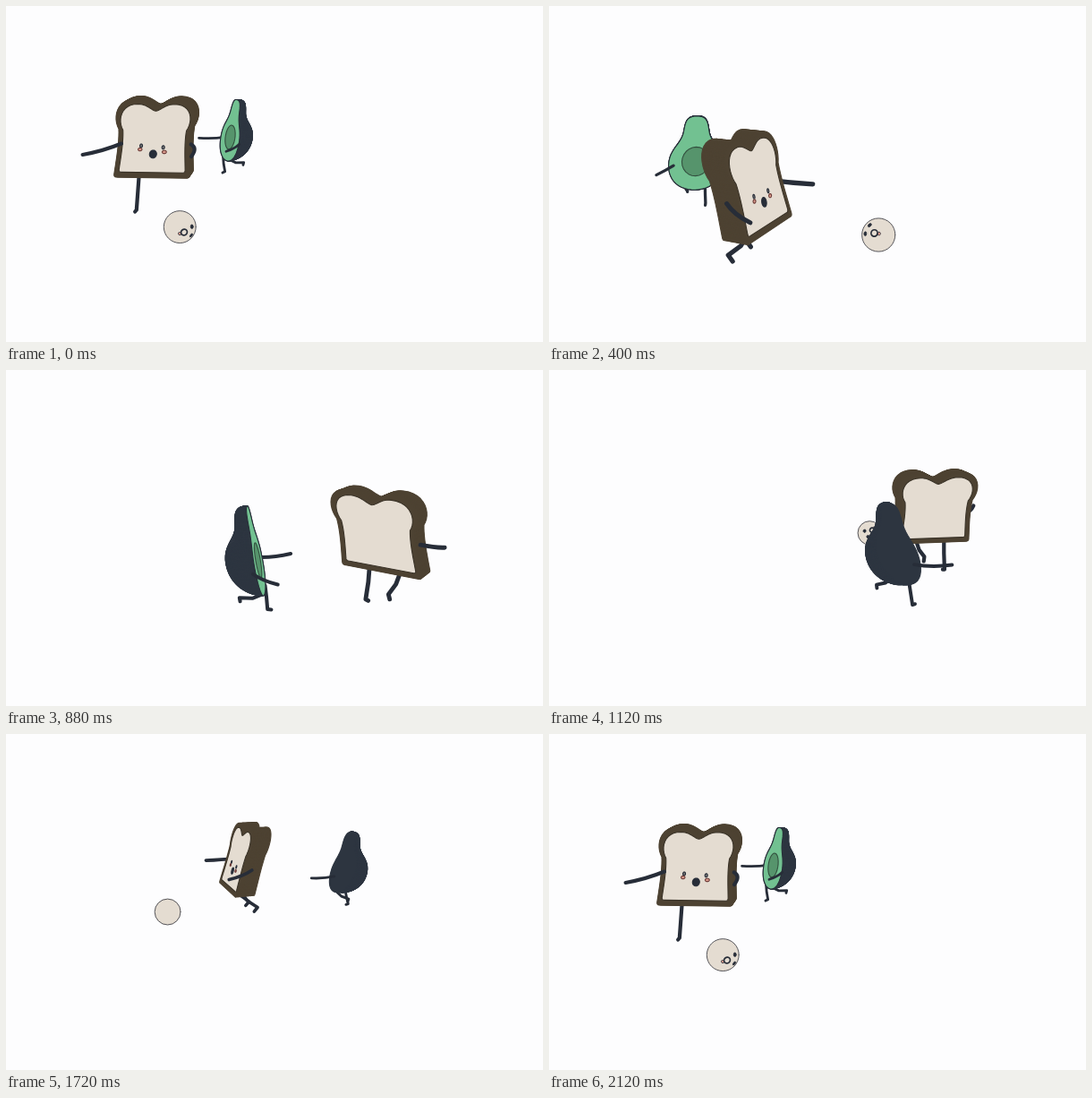
Write an HTML page with a canvas that moves like this. It is 600 px wide and 375 px high and loops after 2160 ms.

```html
<!DOCTYPE html>
<html lang="en">
<head>
<meta charset="utf-8">
<title>Toast chase</title>
<style>
html, body { margin: 0; width: 100%; height: 100%; overflow: hidden; background: #fdfdfe; }
canvas { display: block; }
</style>
</head>
<body>
<canvas id="stage" width="600" height="375"></canvas>
<script>
const ctx = document.getElementById('stage').getContext('2d');
const { sin, cos, sqrt, abs, max, hypot, atan2, PI } = Math;
const LOOP = 2160, STEP = 40, LAP = 2120, STRIDES = 4, ROLLS = 3, RING = 133, RAD = PI / 180;
const INK = '#272d38', CREAM = '#e4dcd1', CRUST = '#4d4232', GREEN = '#72c191',
      PIT = '#56946c', SKIN = '#2d3540', BLUSH = '#d99a8c';

// World: x right, y down, z towards the viewer; the camera looks down a little.
const SLOPE = 0.27;
const zoom = z => 1 / (1 - z / 695);
const project = (x, y, z) => [298 + x * zoom(z), 187.5 + (y + SLOPE * z) * zoom(z), z];
const ringPoint = angle => [-RING * cos(angle), RING * sin(angle)];

// Left half of an outline, given as cubic curves, mirrored to a closed polygon.
function outline(x, y, curves) {
  const left = [[x, y]];
  for (const [a, b, c, d, e, f] of curves) {
    for (let i = 1; i <= 12; i++) {
      const u = i / 12, v = 1 - u;
      const mix = (p, q, r, s) => v * v * v * p + 3 * v * v * u * q + 3 * v * u * u * r + u * u * u * s;
      left.push([mix(x, a, c, e), mix(y, b, d, f)]);
    }
    [x, y] = [e, f];
  }
  return left.concat(left.map(([p, q]) => [-p, q]).reverse());
}
const slice = outline(0, -35, [
  [-6, -36, -12, -44, -24, -44], [-47, -44, -49, -22, -41, -10],
  [-39, 5, -41, 25, -42, 40], [-42, 43, -40, 43, -38, 43]
]);
const pear = outline(0, -50, [
  [-14, -50, -15, -42, -17, -30], [-19, -12, -36, -6, -36, 16], [-36, 38, -20, 50, 0, 50]
]);
const disc = Array.from({ length: 24 }, (_, i) => [cos(i * PI / 12), sin(i * PI / 12)]);

// A body stands on the ring, faces along it and leans back.
function makeBody(angle, { size, height, tilt }, bob) {
  const [cx, cz] = ringPoint(angle), yaw = angle + 3 * RAD, c = cos(yaw), n = sin(yaw);
  const at = (X, Y, Z) => {
    const f = Z + tilt * Y;
    return project(cx + size * (X * c + f * n), height + bob + size * Y * 0.95, cz + size * (f * c - X * n));
  };
  const [o, a, b] = [at(0, 0, 0), at(1, 0, 0), at(0, 1, 0)];
  const front = (a[0] - o[0]) * (b[1] - o[1]) > (a[1] - o[1]) * (b[0] - o[0]);
  return { at, front, depth: cz, scale: size * zoom(cz) };
}

function patch(body, points, fill, stroke) {
  ctx.beginPath();
  for (const p of points) ctx.lineTo(...body.at(...p).slice(0, 2));
  ctx.closePath();
  ctx.fillStyle = fill;
  ctx.fill();
  ctx.strokeStyle = stroke;
  ctx.lineWidth = 1.1;
  ctx.stroke();
}
const flat = (shape, z, sx = 1, sy = sx, x = 0, y = 0) => shape.map(([X, Y]) => [X * sx + x, Y * sy + y, z]);

function limb(body, points, width, curved) {
  const p = points.map(q => body.at(...q).slice(0, 2));
  ctx.beginPath();
  if (curved) {
    ctx.moveTo(...p[0]);
    ctx.quadraticCurveTo(...p[1], ...p[2]);
  } else p.forEach(q => ctx.lineTo(...q));
  ctx.strokeStyle = INK;
  ctx.lineWidth = width * body.scale;
  ctx.stroke();
}

function leg(body, side, phase, { hip, shin, width }) {
  const back = (1 - cos(phase)) / 2, a = 1.2 * back ** 0.7, b = 1.35 * a;
  const X = side * hip[0];
  const knee = [X, hip[1] + shin * cos(a), -shin * sin(a)];
  const heel = [X, knee[1] + shin * cos(b), knee[2] - shin * sin(b)];
  const toe = [X, heel[1] + shin * 0.3 * sin(b), heel[2] + shin * 0.3 * cos(b)];
  limb(body, [[X, hip[1], 0], knee, heel, toe], width);
}

function arm(body, side, phase, { shoulder, reach, length, width }) {
  const e = reach + (1 - reach) * abs(cos(phase / 2));
  const [X, Y, Z] = [side * shoulder[0], shoulder[1], shoulder[2]];
  const elbow = [X + side * length * (8 + 6 * e), Y + 4, Z + length * 20 * e];
  const hand = [X + side * length * (2 + 26 * e), Y + 12 - 10 * e, Z + length * (6 + 40 * e)];
  const points = [[X, Y, Z], elbow, hand];
  const ahead = body.at(...points[0])[2] + body.at(...hand)[2] > 2 * body.depth;
  return { ahead, draw: () => limb(body, points, width, true) };
}

function runner(angle, phase, build) {
  const body = makeBody(angle, build, -build.bounce * cos(2 * phase));
  const stride = side => phase + (side > 0 ? PI : 0);
  const paint = () => {
    const arms = [-1, 1].map(side => arm(body, side, stride(side), build));
    for (const side of [-1, 1]) leg(body, side, stride(side), build);
    arms.filter(a => !a.ahead).forEach(a => a.draw());
    build.torso(body);
    arms.filter(a => a.ahead).forEach(a => a.draw());
  };
  return { depth: body.depth, paint };
}

function breadTorso(body) {
  const near = body.front ? 12 : -12;
  for (let i = -8; i <= 8; i++) patch(body, flat(slice, near * i / 8), CRUST, CRUST);
  patch(body, flat(slice, near, 0.88, 0.87), CREAM, '#3a3328');
  if (!body.front) return;
  const dot = (x, y, rx, ry, fill, stroke) => patch(body, flat(disc, near, rx, ry, x, y), fill, stroke);
  dot(-14, 8.5, 1.5, 2, '#777', INK);
  dot(11, 10, 1.5, 2, '#777', INK);
  dot(-15, 12.5, 2.2, 1.6, BLUSH, '#6b3a36');
  dot(12.5, 15, 2.4, 1.7, BLUSH, '#6b3a36');
  dot(0, 17.5, 4, 4.3, INK, INK);
}

// The skin is half a solid of revolution behind the flat cut.
function pearTorso(body) {
  for (let i = 24; i >= 0; i--) {
    const a = i / 24 * PI / 2;
    patch(body, pear.map(([X, Y]) => [X * cos(a), Y, -abs(X) * sin(a)]), SKIN, SKIN);
  }
  if (!body.front) return;
  patch(body, flat(pear, 0), GREEN, INK);
  patch(body, flat(disc, 0, 18.5, 19.5, 0, 12), PIT, '#33503f');
}

function ball(angle, lap) {
  const [cx, cz] = ringPoint(angle), [x, y] = project(cx, 24, cz), r = 15.4 * zoom(cz);
  const roll = 2 * PI * ROLLS * lap + 0.1;
  const sway = -0.75 * cos(2 * PI * lap - PI / 4), rest = sqrt(1 - sway * sway);
  // Point on the rolling ball, from its parts around and along the axle, seen by the camera.
  const seen = (around, axle) => {
    const f = around * cos(roll), Y = around * sin(roll);
    const X = f * sin(angle) + axle * cos(angle), Z = f * cos(angle) - axle * sin(angle);
    return [X, Y + SLOPE * Z, Z - SLOPE * Y];
  };
  const face = seen(rest, sway), up = seen(-sway, rest);
  const side = [0, 1, 2].map(i => {
    const j = (i + 1) % 3, k = (i + 2) % 3;
    return face[j] * up[k] - face[k] * up[j];
  });
  const spot = (u, v, size, fill, width) => {
    const p = face.map((f, i) => f + up[i] * u + side[i] * v), l = hypot(...p);
    const [a, b, c] = p.map(q => q / l);
    if (c < 0) return;
    ctx.beginPath();
    ctx.ellipse(x + a * r, y + b * r, size * r * max(c, 0.3), size * r, atan2(b, a), 0, 2 * PI);
    if (fill) { ctx.fillStyle = fill; ctx.fill(); }
    ctx.strokeStyle = INK;
    ctx.lineWidth = width;
    ctx.stroke();
  };
  const paint = () => {
    ctx.beginPath();
    ctx.arc(x, y, r, 0, 2 * PI);
    ctx.fillStyle = CREAM;
    ctx.fill();
    ctx.strokeStyle = '#44444a';
    ctx.lineWidth = 0.9;
    ctx.stroke();
    spot(-0.28, 0.1, 0.1, BLUSH, 0.7);
    spot(0, 0, 0.2, null, 1.7);
    spot(0.7, 0.36, 0.13, INK, 0.7);
    spot(0.7, -0.36, 0.13, INK, 0.7);
  };
  return { depth: cz, paint };
}

const bread = {
  size: 1, height: -32, tilt: 0.28, bounce: 7.5, torso: breadTorso,
  hip: [17, 41], shin: 20, shoulder: [40, 9, 0], reach: 0, length: 1, width: 4.3
};
const avocado = {
  size: 0.82, height: -25, tilt: 0.2, bounce: 0, torso: pearTorso,
  hip: [13, 46], shin: 14, shoulder: [30, 18, -4], reach: 0.6, length: 0.8, width: 4
};

function draw(t) {
  const lap = t / LAP, angle = 2 * PI * lap - 6 * RAD, phase = 2 * PI * STRIDES * lap;
  ctx.fillStyle = '#fdfdfe';
  ctx.fillRect(0, 0, 600, 375);
  ctx.lineCap = ctx.lineJoin = 'round';
  [
    runner(angle, phase, bread),
    runner(angle - 60 * RAD, phase - 0.7, avocado),
    ball(angle + 54 * RAD, lap)
  ].sort((a, b) => a.depth - b.depth).forEach(actor => actor.paint());
}

function tick() {
  draw(Math.floor(performance.now() % LOOP / STEP) * STEP % LAP);
  requestAnimationFrame(tick);
}
tick();
</script>
</body>
</html>
```
